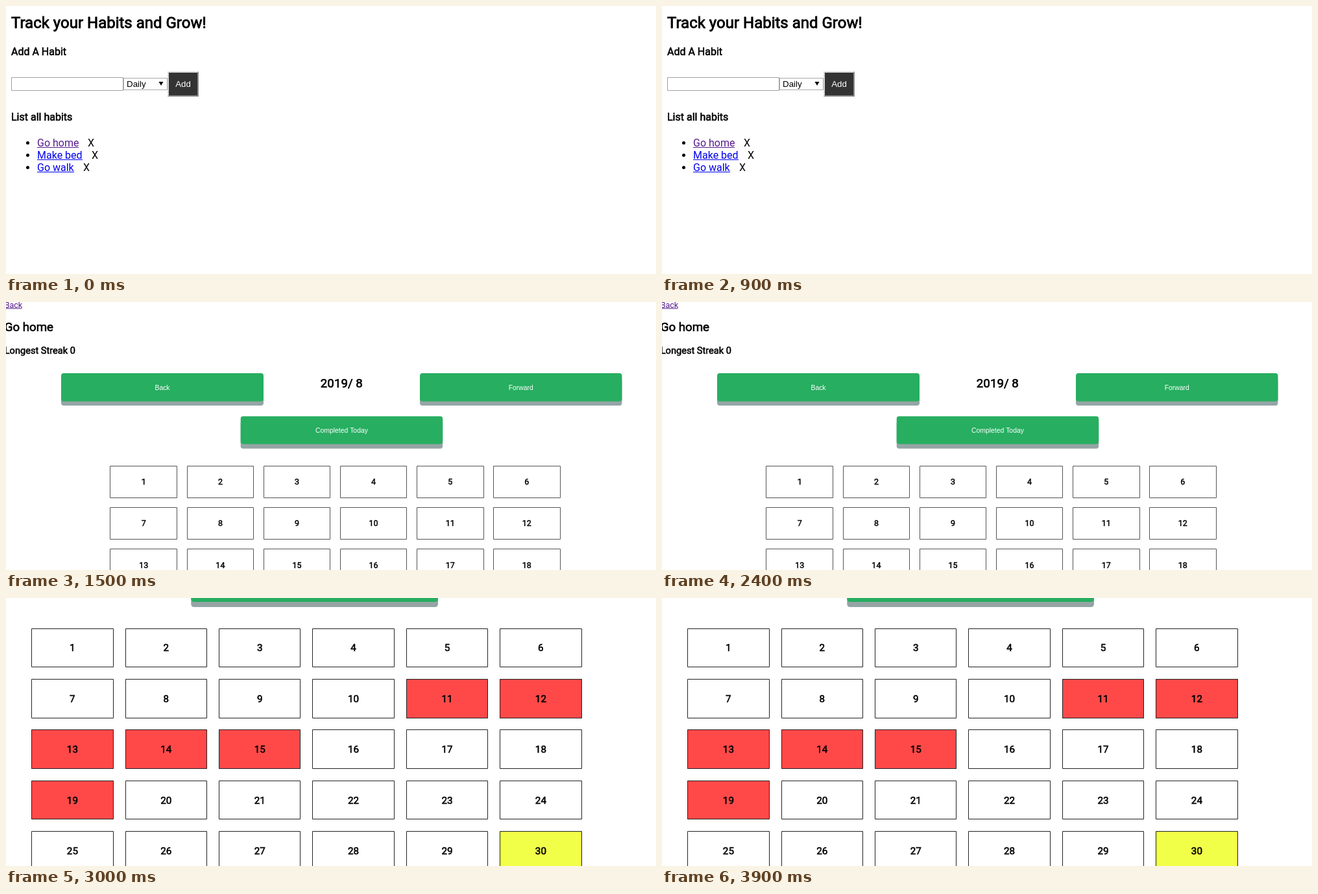
Write an HTML page with a canvas that moves like this. It is 1002 by 414 pixels and loops after 4.5 s.

```html
<!DOCTYPE html>
<html lang="en">
<head>
<meta charset="utf-8">
<title>Habit tracker</title>
<style>
  html, body { margin: 0; width: 100%; height: 100%; overflow: hidden; background: #fff; }
  canvas { display: block; }
</style>
</head>
<body>
<canvas id="stage" width="1002" height="414"></canvas>
<script>
const ctx = document.getElementById('stage').getContext('2d');
const ROBOTO = 'Roboto, sans-serif';
const ARIAL = '"Liberation Sans", Arial, sans-serif';
const SCENE_MS = 1500;

function rect(x, y, w, h, fill) {
  ctx.fillStyle = fill;
  ctx.fillRect(x, y, w, h);
}

function frame(x, y, w, h, color) {
  ctx.strokeStyle = color;
  ctx.lineWidth = 1;
  ctx.strokeRect(x + 0.5, y + 0.5, w - 1, h - 1);
}

function polygon(points, fill) {
  ctx.beginPath();
  points.forEach(([x, y]) => ctx.lineTo(x, y));
  ctx.fillStyle = fill;
  ctx.fill();
}

function text(str, x, y, size, { family = ROBOTO, color = '#000', align = 'left' } = {}) {
  ctx.font = `${size}px ${family}`;
  ctx.textAlign = align;
  ctx.fillStyle = color;
  ctx.fillText(str, x, y);
}

// Regular outlines thickened, keeping the regular advance widths.
function heading(str, x, y, size, align = 'left') {
  text(str, x, y, size, { align });
  ctx.strokeStyle = '#000';
  ctx.lineWidth = size / 28;
  ctx.lineJoin = 'round';
  ctx.strokeText(str, x, y);
}

function link(str, x, y, size, color) {
  text(str, x, y, size, { color });
  const w = Math.round(ctx.measureText(str).width);
  rect(x, y + 1, w, 1, color);
  return w;
}

function greenButton(label, x, y, w, h, lip, radius) {
  ctx.fillStyle = '#95a5a6';
  ctx.beginPath();
  ctx.roundRect(x, y + lip, w, h, radius);
  ctx.fill();
  ctx.fillStyle = '#27ae60';
  ctx.beginPath();
  ctx.roundRect(x, y, w, h, radius);
  ctx.fill();
  text(label, x + w / 2, y + h / 2 + 3.8, 10.4, { family: ARIAL, color: '#fff', align: 'center' });
}

// Cell edges snap to whole pixels; the day numbers keep the exact centres.
function calendar({ x, y, dx, dy, w, h, size, border, fills = {} }) {
  for (let day = 1; day <= 30; day++) {
    const cx = x + (day - 1) % 6 * dx;
    const cy = y + Math.floor((day - 1) / 6) * dy;
    if (cy > 414) break;
    const left = Math.round(cx), top = Math.round(cy);
    const cw = Math.round(cx + w) - left, ch = Math.round(cy + h) - top;
    if (fills[day]) rect(left, top, cw, ch, fills[day]);
    frame(left, top, cw, ch, border);
    heading(String(day), cx + w / 2, cy + h / 2 + size * 0.355, size, 'center');
  }
}

function habitList() {
  heading('Track your Habits and Grow!', 8, 34, 24);
  heading('Add A Habit', 8, 76, 16);

  frame(8, 110, 173, 21, '#a0a0a0');
  frame(181, 111, 68, 19, '#a9a9a9');
  text('Daily', 186, 125, 13.333, { family: ARIAL });
  polygon([[235.5, 117], [242.5, 117], [239, 123]], '#000');

  rect(249, 101, 48, 39, '#d8d8d8');
  polygon([[297, 101], [297, 140], [249, 140], [251, 138], [295, 138], [295, 103]], '#8b8b8b');
  rect(251, 103, 44, 35, '#333');
  text('Add', 273, 125, 13.333, { family: ARIAL, color: '#fff', align: 'center' });

  heading('List all habits', 8, 177, 16);
  ['Go home', 'Make bed', 'Go walk'].forEach((name, i) => {
    const y = 217 + i * 19;
    ctx.fillStyle = '#000';
    ctx.beginPath();
    ctx.arc(33.5, y - 5.5, 2.5, 0, Math.PI * 2);
    ctx.fill();
    const w = link(name, 48, y, 16, i ? '#0000ee' : '#551a8b');
    text('X', 48 + w + 14, y, 16);
  });
}

function habitPage() {
  link('Back', -2.3, 8.5, 12.5, '#551a8b');
  heading('Go home', -2.3, 45, 18.7);
  heading('Longest Streak 0', -2.3, 80, 14.6);
  heading('2019/ 8', 517.3, 131.5, 18.7, 'center');
  greenButton('Back', 85, 110, 312, 43.5, 6.5, 4);
  greenButton('Forward', 638, 110, 311.5, 43.5, 6.5, 4);
  greenButton('Completed Today', 361.7, 176.5, 311.5, 43, 7, 4);
  calendar({ x: 160.45, y: 253, dx: 118.1, dy: 64.2, w: 103.7, h: 49.5, size: 12.5, border: '#555' });
}

function habitDays() {
  greenButton('', 285.3, -46, 380.7, 52, 8, 4.5);
  const fills = { 30: '#f2ff49' };
  [11, 12, 13, 14, 15, 19].forEach(day => fills[day] = '#ff4949');
  calendar({ x: 39.2, y: 46.5, dx: 144.4, dy: 78.45, w: 126.4, h: 60.6, size: 15.25, border: '#222', fills });
}

const scenes = [habitList, habitPage, habitDays];
const start = performance.now();

function tick() {
  const t = performance.now() - start;
  rect(0, 0, 1002, 414, '#fff');
  scenes[Math.floor(t / SCENE_MS) % scenes.length]();
  requestAnimationFrame(tick);
}
tick();
</script>
</body>
</html>
```
